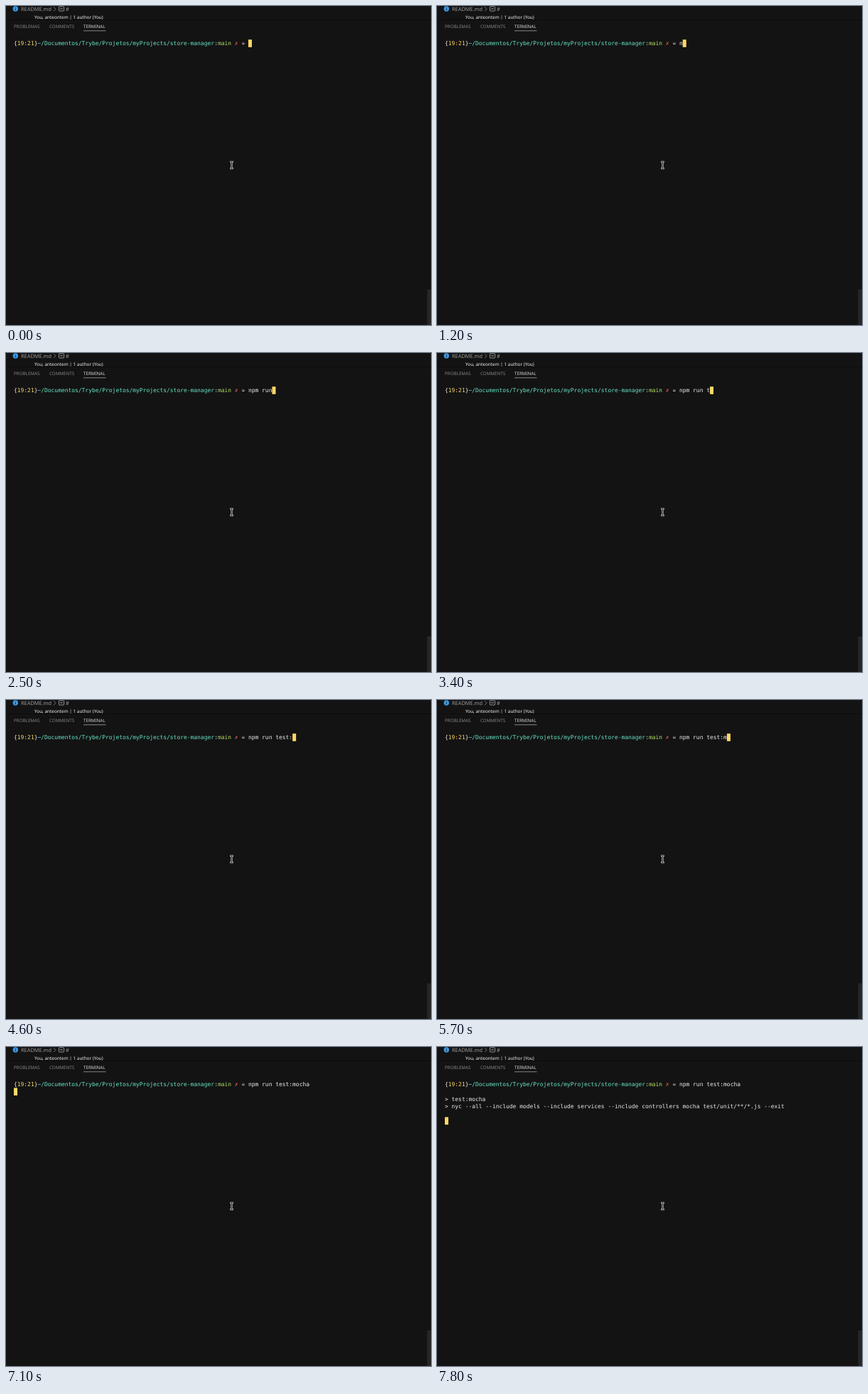
An HTML page for the animation above (8000 ms loop, 598 px wide and 448 px high).

```html
<!DOCTYPE html>
<html lang="pt-BR">
<head>
<meta charset="utf-8">
<title>Terminal</title>
<style>
  html, body { margin: 0; width: 100%; height: 100%; overflow: hidden; background: #131313; }
  svg { display: block; width: 598px; height: 448px; }
  text { white-space: pre; text-rendering: geometricPrecision; }
  .ui { font-family: "Noto Sans", "Open Sans", sans-serif; }
  .term { font: 7.943px "DejaVu Sans Mono", monospace; fill: #ececea; }
</style>
</head>
<body>
<svg viewBox="0 0 598 448">
  <rect width="598" height="448" fill="#131313"/>

  <g class="ui" font-size="7.4" fill="#9c9c9c">
    <circle cx="13.3" cy="4" r="3.7" fill="#3b9be8"/>
    <path d="M13.3 1.8v1M13.3 3.6v2.6" stroke="#131313" stroke-width=".9"/>
    <text x="21" y="6.9">README.md</text>
    <path d="M67 1.2l3 3-3 3" fill="none" stroke="#8c8c8c" stroke-width=".8"/>
    <rect x="74.4" y=".8" width="7.2" height="6.2" rx=".8" fill="none" stroke="#b0b0b0" stroke-width=".8"/>
    <path d="M76 3.9h4" stroke="#b0b0b0" stroke-width=".9"/>
    <text x="84" y="6.9">#</text>
  </g>
  <text class="ui" x="40" y="17.8" font-size="6.4" font-weight="500" fill="#f0f0f0">You, anteontem | 1 author (You)</text>
  <path d="M0 19.5H598" stroke="#0c0c0c"/>

  <g class="ui" font-size="6.25" fill="#858585">
    <text x="11" y="30.5">PROBLEMAS</text>
    <text x="61" y="30.5">COMMENTS</text>
    <text x="109" y="30.5" fill="#d6d6d6">TERMINAL</text>
    <path d="M109 34.8H140.5" stroke="#a8a8a8" stroke-width=".8"/>
  </g>

  <rect id="cursor" width="5" height="10.6" fill="#ffd866"/>
  <g id="terminal" class="term"></g>

  <rect x="592.5" y="398" width="5.5" height="50" fill="#262626"/>
  <g fill="none">
    <path d="M315 218.8h5M317.5 218.8v9.4M315 228.2h5" stroke="#dcdcdc" stroke-width="2.2"/>
    <path d="M315 218.8h5M317.5 218.8v9.4M315 228.2h5" stroke="#151515" stroke-width=".8"/>
  </g>
</svg>
<script>
const LOOP = 8000, LEFT = 11, TOP = 47.2, CELL = 4.782, ROW = 10.25, PROMPT_COLS = 69;
const terminal = document.getElementById('terminal');
const cursor = document.getElementById('cursor');
const command = 'npm run test:mocha';

// [time, number of typed characters]
const typing = [
  [1200, 1], [1300, 2], [1400, 3], [1700, 4],
  [2300, 5], [2400, 6], [2500, 7], [2700, 8],
  [3400, 9], [3500, 10], [3700, 12], [4600, 13],
  [5700, 14], [5800, 15], [6100, 16], [6200, 17], [6300, 18]
];
const ENTER = 7100, OUTPUT = 7600;

function addText(col, row, content, color) {
  const el = document.createElementNS('http://www.w3.org/2000/svg', 'text');
  el.setAttribute('x', LEFT + col * CELL);
  el.setAttribute('y', TOP + row * ROW + 8);
  if (color) el.style.fill = color;
  el.textContent = content;
  return terminal.appendChild(el);
}

addText(0, 0, '{');
addText(1, 0, '19:21', '#ffd866');
addText(6, 0, '}');
addText(7, 0, '~/Documentos/Trybe/Projetos/myProjects/store-manager', '#68e6c6');
addText(59, 0, ':');
addText(60, 0, 'main', '#b2de62');
addText(65, 0, '✗', '#f0604d');
addText(67, 0, '➭');
const typed = addText(PROMPT_COLS, 0, '');
const output = [
  addText(0, 2, '> test:mocha'),
  addText(0, 3, '> nyc --all --include models --include services --include controllers mocha test/unit/**/*.js --exit')
];

function render(time) {
  const count = typing.reduce((n, [at, chars]) => time >= at ? chars : n, 0);
  typed.textContent = command.slice(0, count);
  for (const line of output) line.style.display = time >= OUTPUT ? '' : 'none';
  const row = time >= OUTPUT ? 5 : time >= ENTER ? 1 : 0;
  cursor.setAttribute('x', LEFT + (row ? 0 : PROMPT_COLS + count) * CELL);
  cursor.setAttribute('y', TOP + row * ROW);
}

const start = performance.now();
function tick() {
  render((performance.now() - start) % LOOP);
  requestAnimationFrame(tick);
}
tick();
</script>
</body>
</html>
```
